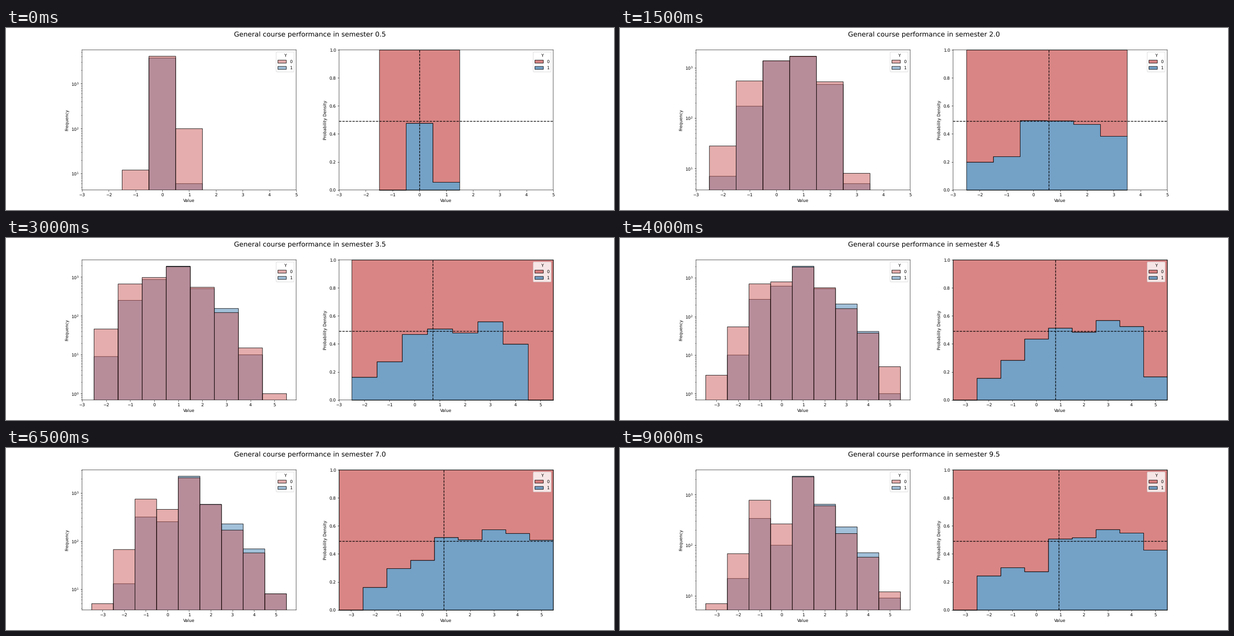
Animation of 1280x384 px, one loop 9500 ms. Source, as a matplotlib script:

```python
import numpy as np
import matplotlib.pyplot as plt
from matplotlib.animation import FuncAnimation
from matplotlib.colors import to_rgba
from matplotlib.patches import Patch

STEPS, INTERVAL = 19, 500
STUDENTS = 7900
SCORES = np.arange(-3, 6)
COLORS = ("indianred", "steelblue")

plt.rcParams.update({"path.snap": False, "text.hinting": "none"})


def hill(t, limit, half, power=1):
    """Growth from 0 to limit that is halfway at t = half."""
    return limit * t**power / (t**power + half**power)


def first_counts():
    start = np.zeros((2, len(SCORES)))
    start[:, 2:5] = (12, 4068, 100), (0, 3719, 6)
    return start


def counts(t):
    """Students per score for Y = 0 and Y = 1, t half-semesters after the start."""
    if t == 0:
        return first_counts()
    # Score: (students, share with Y = 1)
    groups = {
        -2: (hill(t, 129, 8), 0.153 + 0.0013 * (t - 9.7) ** 2),
        -1: (hill(t, 1251, 2.2), hill(t, 0.32, 1)),
        0: (4131 * np.exp(-0.135 * t), min(0.497, 0.566 - 0.0162 * t)),
        2: (950 + 16.5 * t, 0.46 + 0.0032 * t),
        3: (hill(t, 400, 5.24, 6), hill(t, 0.575, 2.5, 4)),
        4: (hill(t, 130, 7.5, 6.5), hill(t, 0.55, 5.2, 7)),
    }
    rest = STUDENTS - sum(n for n, _ in groups.values())
    groups[1] = rest, 0.519 - 0.0003 * (t - 12) ** 2
    middle = np.array([(n - n * p, n * p) for _, (n, p) in sorted(groups.items())])
    # The extreme scores appear late and stay rare
    lowest = np.interp(t, [8, 18], [3, 7], left=0), 0
    highest = (np.interp(t, [4, 6, 8, 11, 18], [1, 1, 5, 7, 12], left=0),
               np.interp(t, [6, 8, 11, 18], [0, 1, 7, 9]))
    return np.round(np.vstack([lowest, middle, highest]).T)


def finish(ax, ylabel, alpha, lo, hi):
    ax.set_xticks(SCORES)
    ax.set_xlim(min(lo, SCORES[0]), max(hi, SCORES[-1]))
    ax.set_xlabel("Value")
    ax.set_ylabel(ylabel)
    handles = [Patch(facecolor=to_rgba(c, alpha), edgecolor="k") for c in COLORS]
    ax.legend(handles, ["0", "1"], title="Y", loc="upper right")


def draw_frequency(ax, scores, groups):
    ax.clear()
    ax.set_yscale("log")
    for n, color in reversed(list(zip(groups, COLORS))):
        some = n > 0
        ax.bar(scores[some], n[some], width=1, facecolor=to_rgba(color, 0.5),
               edgecolor="k", linewidth=1)
    low, high = np.log10([groups[groups > 0].min(), groups.max()])
    pad = 0.05 * (high - low)
    ax.set_ylim(10 ** (low - pad), 10 ** (high + pad))
    margin = 0.5 + 0.05 * len(scores)
    finish(ax, "Frequency", 0.5, scores[0] - margin, scores[-1] + margin)


def draw_share(ax, scores, groups):
    ax.clear()
    total = groups.sum(axis=0)
    share = groups[1] / total
    share = np.append(share, share[-1])
    edges = np.append(scores - 0.5, scores[-1] + 0.5)
    layers = ((0, share, COLORS[1]), (share, 1, COLORS[0]))
    for bottom, top, color in layers:
        ax.fill_between(edges, bottom, top, step="post", linewidth=1,
                        facecolor=to_rgba(color, 0.75), edgecolor="k")
    ax.axhline(0.49, color="k", linestyle="--")
    ax.axvline(np.average(scores, weights=total), color="k", linestyle="--")
    ax.set_ylim(0, 1)
    finish(ax, "Probability Density", 0.75, edges[0], edges[-1])


def draw(step):
    groups = counts(step)
    used = groups.sum(axis=0) > 0
    draw_frequency(left, SCORES[used], groups[:, used])
    draw_share(right, SCORES[used], groups[:, used])
    title.set_text(f"General course performance in semester {(step + 1) / 2}")


fig, (left, right) = plt.subplots(1, 2, figsize=(20, 6), dpi=64)
title = fig.suptitle("", fontsize=16)
anim = FuncAnimation(fig, draw, frames=STEPS, interval=INTERVAL,
                     init_func=lambda: draw(0), repeat=True)
plt.show()
```
